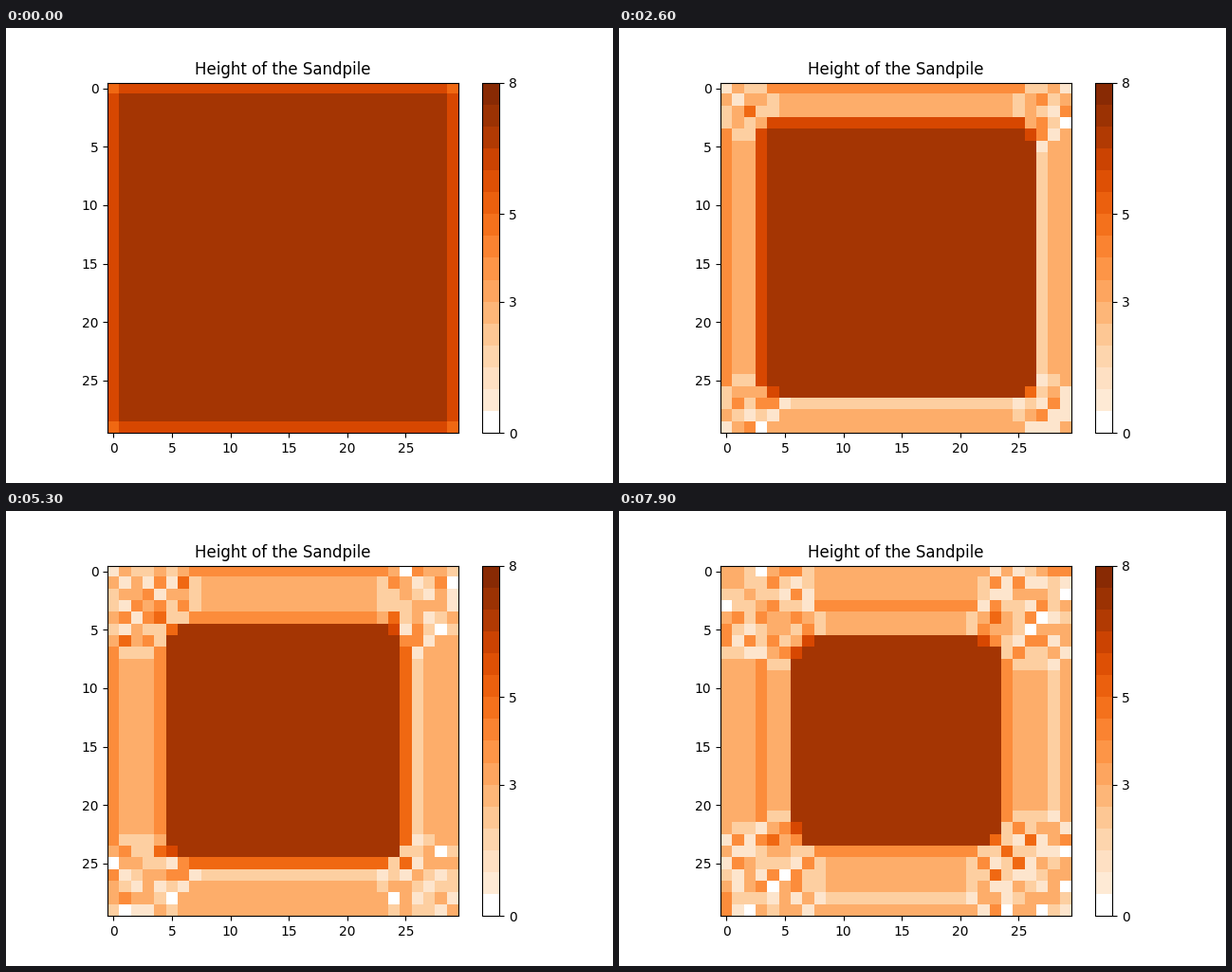
Animation, 640 px wide and 480 px high, one loop 8000 ms. Source, as a matplotlib script:

```python
import matplotlib.pyplot as plt
import numpy as np
from matplotlib.animation import FuncAnimation
from matplotlib.cm import ScalarMappable
from matplotlib.colors import ListedColormap, Normalize

SIZE, FRAMES, STEP_MS = 30, 80, 100
START, LIMIT, TOP = 7, 4, 8
BANDS = 2 * TOP


def sweep(pile):
    """Topple each unstable cell once, in reading order and in place."""
    for i in range(SIZE):
        for j in range(SIZE):
            if pile[i][j] < LIMIT:
                continue
            pile[i][j] -= LIMIT
            for y, x in ((i - 1, j), (i + 1, j), (i, j - 1), (i, j + 1)):
                if 0 <= y < SIZE and 0 <= x < SIZE:
                    pile[y][x] += 1


def simulate():
    pile = [[START] * SIZE for _ in range(SIZE)]
    states = []
    for _ in range(FRAMES):
        sweep(pile)
        states.append(np.array(pile))
    return states


def shades(heights):
    """Orange shades for rising heights, with the lowest one white."""
    colors = plt.get_cmap("Oranges")(heights / TOP)
    colors[0] = 1
    return ListedColormap(colors)


cell_cmap = shades(np.arange(TOP + 1))
bar_cmap = shades((np.arange(BANDS) + 0.5) * TOP / BANDS)
states = simulate()

fig, ax = plt.subplots(figsize=(6.4, 4.8), dpi=100)
image = ax.imshow(states[0], cmap=cell_cmap, vmin=-0.5, vmax=TOP + 0.5,
                  interpolation="nearest")
ax.set_title("Height of the Sandpile")
fig.colorbar(ScalarMappable(Normalize(0, TOP), bar_cmap), ax=ax,
             ticks=[0, 3, 5, 8])


def update(frame):
    image.set_data(states[frame])
    return [image]


anim = FuncAnimation(fig, update, frames=FRAMES, interval=STEP_MS,
                     repeat=True, repeat_delay=0)
plt.show()
```
